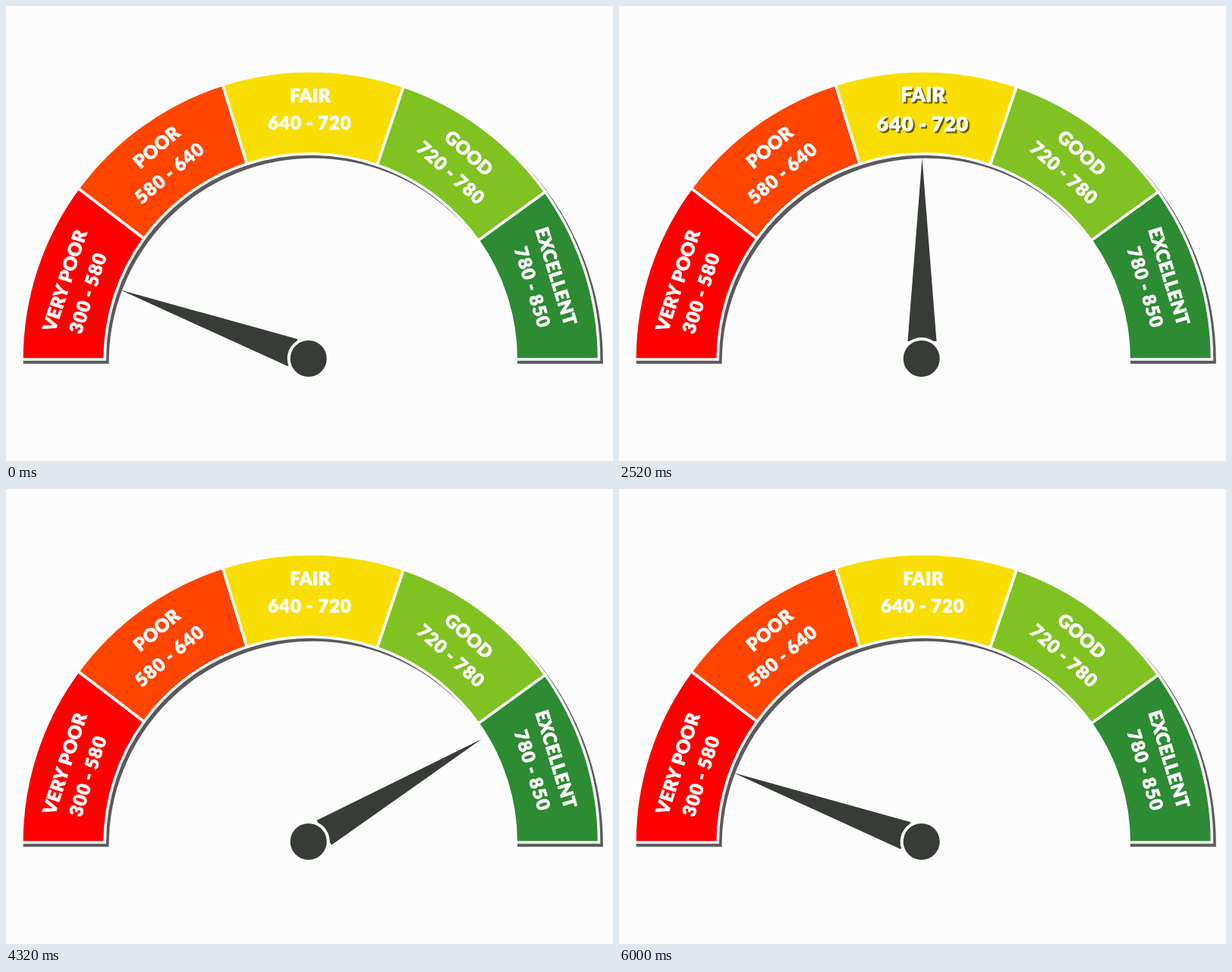
Animation of 800 by 600 pixels, one loop 6040 ms. Source, as an HTML page:

```html
<!DOCTYPE html>
<html lang="en">
<head>
<meta charset="utf-8">
<title>Score gauge</title>
<style>
  html, body { margin: 0; width: 100%; height: 100%; overflow: hidden; background: #fcfcfc; }
  svg { display: block; width: 800px; height: 600px; }
  text {
    font: 900 24px Lato, "Open Sans", sans-serif; letter-spacing: .3px;
    fill: #fff; stroke: #fff; stroke-width: .7; text-anchor: middle;
  }
  .range { letter-spacing: 1px; word-spacing: -1px; }
</style>
</head>
<body>
<svg viewBox="0 0 800 600">
  <path id="shade" fill="#5b595c" stroke="#5b595c" stroke-width="3.6" transform="translate(3.6 4)"/>
  <g id="bands" stroke="#fff" stroke-width="3.6"></g>
  <g id="labels"></g>
  <path id="needle" d="M0 -264.5L19 -23H-19Z" fill="#383c37"/>
  <circle cx="398.7" cy="465" r="28" fill="#fff"/>
  <circle cx="398.7" cy="465" r="24" fill="#383c37"/>
</svg>
<script>
const LOOP = 6040, STEP = 40, LAG = 10;
const CX = 401.2, CY = 466, OUTER = 380.3, INNER = 271;
const $ = id => document.getElementById(id);

// Angles are in degrees from straight up; edges are [outer, inner].
const edges = [[-90, -90], [-53.6, -54], [-17.7, -18], [18.85, 18.95], [54.5, 54.7], [90, 90]];
const bands = [
  { color: '#ff0000', name: ['VERY POOR', 77.5, 362], range: ['300 - 580', 108, 378.5], turn: -72 },
  { color: '#ff4500', name: ['POOR', 198.5, 186], range: ['580 - 640', 215.5, 220], turn: -40 },
  { color: '#f8de02', name: ['FAIR', 401, 118], range: ['640 - 720', 400.5, 154], turn: 0 },
  { color: '#80c222', name: ['GOOD', 610, 194], range: ['720 - 780', 586.5, 220], turn: 42 },
  { color: '#2c8b33', name: ['EXCELLENT', 725, 356.5], range: ['780 - 850', 694, 371], turn: 73 }
];
const stops = [-70, -36, 0, 36, 70.4, -70];

function point(r, deg) {
  const a = deg * Math.PI / 180;
  return `${CX + r * Math.sin(a)} ${CY - r * Math.cos(a)}`;
}

function ring(from, to) {
  return `M${point(OUTER, from[0])}A${OUTER} ${OUTER} 0 0 1 ${point(OUTER, to[0])}` +
    `L${point(INNER, to[1])}A${INNER} ${INNER} 0 0 0 ${point(INNER, from[1])}Z`;
}

function add(parent, tag, attrs, content = '') {
  const el = document.createElementNS('http://www.w3.org/2000/svg', tag);
  for (const key in attrs) el.setAttribute(key, attrs[key]);
  el.textContent = content;
  return parent.appendChild(el);
}

$('shade').setAttribute('d', ring(edges[0], edges[5]));

bands.forEach((band, i) => {
  add($('bands'), 'path', { d: ring(edges[i], edges[i + 1]), fill: band.color });
  band.label = add($('labels'), 'g', {});
  for (const kind of ['name', 'range']) {
    const [words, x, y] = band[kind];
    add(band.label, 'text', { class: kind, y: 8.6, transform: `translate(${x} ${y}) rotate(${band.turn})` }, words);
  }
  band.x = (band.name[1] + band.range[1]) / 2;
  band.y = (band.name[2] + band.range[2]) / 2;
});

const ramp = (t, start, span) => Math.min(1, Math.max(0, (t - start) / span));
const smooth = p => p * p * (3 - 2 * p);

function draw(now) {
  const t = Math.floor(now % LOOP / STEP) * STEP - LAG;

  let angle = stops[0];
  for (let i = 1; i < stops.length; i++) {
    angle += (stops[i] - stops[i - 1]) * smooth(ramp(t, i * 1000, i === 5 ? 1000 : 500));
  }
  $('needle').setAttribute('transform', `translate(399.5 465) rotate(${angle})`);

  bands.forEach(({ label, x, y }, i) => {
    const lift = ramp(t, i ? i * 1000 + 400 : 0, 100) - ramp(t, i * 1000 + 1200, 100);
    label.setAttribute('transform', `translate(${x} ${y}) scale(${1 + 0.1 * lift}) translate(${-x} ${-y})`);
    label.style.filter = lift > 0
      ? `drop-shadow(${2.8 * lift}px ${2.8 * lift}px .4px rgba(0, 0, 0, ${0.6 * lift}))`
      : 'none';
  });
  requestAnimationFrame(draw);
}
requestAnimationFrame(draw);
</script>
</body>
</html>
```
